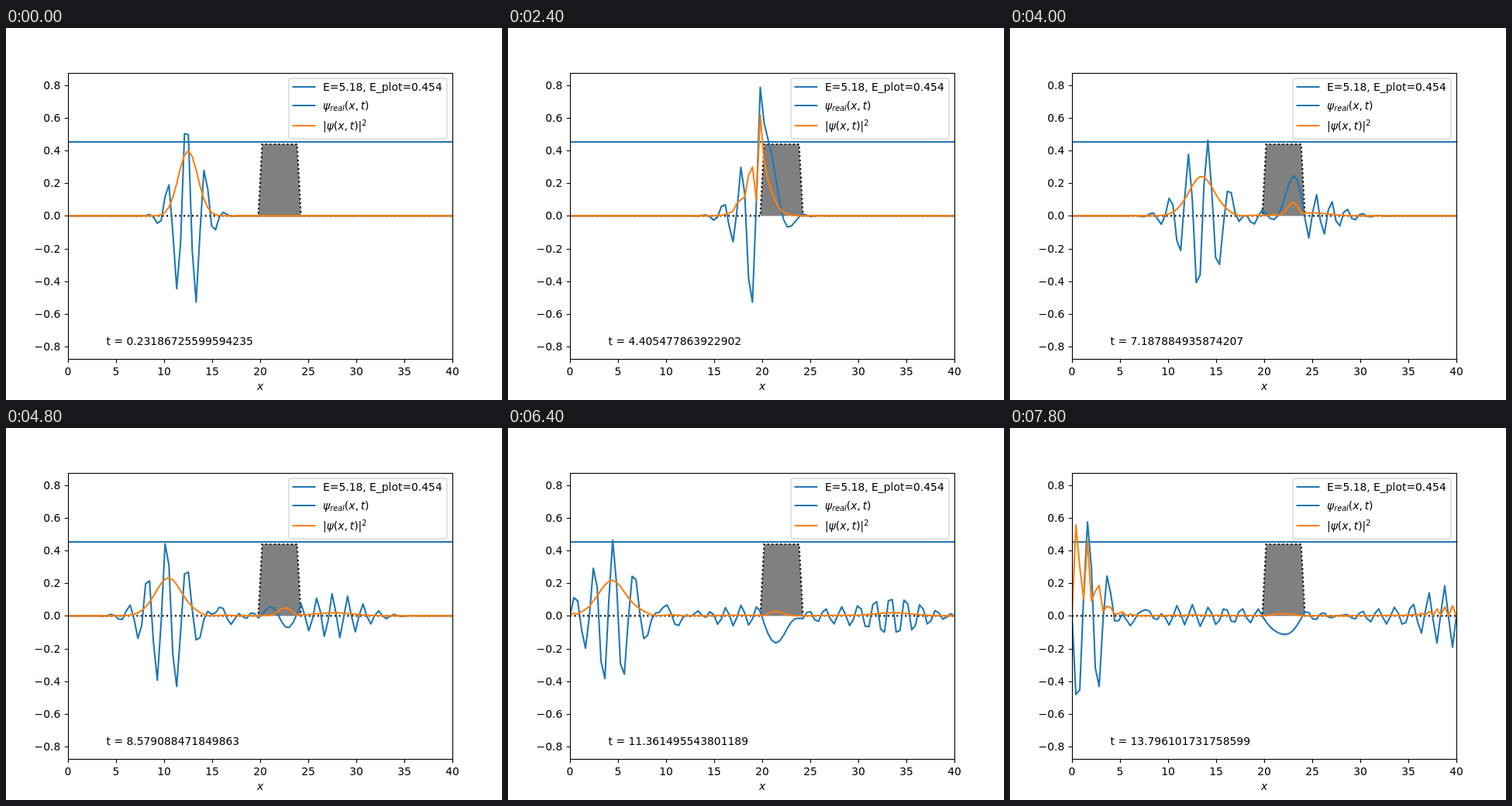
These frames come from a looping animation (640 by 480 pixels, 8000 ms). An HTML page:

```html
<!DOCTYPE html>
<html lang="en">
<head>
<meta charset="utf-8">
<title>Wave packet at a potential barrier</title>
<style>
  html, body { margin: 0; width: 100%; height: 100%; overflow: hidden; background: #fff; }
  svg { display: block; width: 640px; height: 480px; }
  text { font: 13.89px "DejaVu Sans", sans-serif; white-space: pre; }
  .small { font-size: 9.72px; }
  .it { font-style: italic; }
  .line { fill: none; stroke-width: 2.083; stroke-linejoin: round; stroke-linecap: square; }
  .blue { stroke: #1f77b4; }
  .orange { stroke: #ff7f0e; }
  .dotted { fill: none; stroke: #000; stroke-width: 2.083; stroke-dasharray: 2.083 3.4375; }
  .axis { fill: none; stroke: #000; stroke-width: 1.11; }
  .mid { text-anchor: middle; }
  .end { text-anchor: end; }
</style>
</head>
<body>
<svg viewBox="0 0 640 480">
  <clipPath id="plot"><rect x="80" y="57.6" width="496" height="369.6"/></clipPath>
  <g clip-path="url(#plot)">
    <path id="fill" fill="#808080"/>
    <path id="barrier" class="dotted"/>
    <path id="energy" class="line blue"/>
    <path id="real" class="line blue"/>
    <path id="density" class="line orange"/>
  </g>
  <path id="ticks" class="axis"/>
  <rect class="axis" x="80.5" y="58.5" width="496" height="369"/>
  <g id="labels"></g>
  <text class="mid it" x="328" y="467">x</text>
  <text id="time" x="129.6" y="409"></text>

  <rect x="365" y="65" width="204" height="78" rx="2.8" fill="#fff" fill-opacity=".8" stroke="#ccc" stroke-opacity=".8" stroke-width="1.39"/>
  <path class="line blue" d="M370.6 76h27.8M370.6 100h27.8"/>
  <path class="line orange" d="M370.6 126h27.8"/>
  <text x="409" y="81">E=5.18, E_plot=0.454</text>
  <text x="409" y="104.5"><tspan class="it">ψ</tspan><tspan class="it small" dy="2.3">real</tspan><tspan dy="-2.3">(</tspan><tspan class="it">x</tspan>,<tspan class="it" dx="2.78">t</tspan>)</text>
  <text x="409" y="131">|<tspan class="it">ψ</tspan>(<tspan class="it">x</tspan>,<tspan class="it" dx="2.78">t</tspan>)|<tspan class="small" dy="-5.3">2</tspan></text>
</svg>
<script>
const byId = id => document.getElementById(id);

// Grid, barrier and Gaussian packet (hbar = m = 1)
const N = 100, LENGTH = 40, V0 = 5, K0 = Math.PI, START = 12, SIGMA = 1;
const ENERGY = (K0 ** 2 + 0.5 / SIGMA ** 2) / 2;
const dx = LENGTH / (N - 1);
const dt = 0.23186725599594235 / 2;   // 2 / (2 / dx² + V0)
const xs = Array.from({ length: N }, (_, j) => j * dx);
const V = xs.map(x => x >= 20 && x <= 24 ? V0 : 0);

const envelope = x => (2 * Math.PI * SIGMA ** 2) ** -0.25 * Math.exp(-(((x - START) / (2 * SIGMA)) ** 2));
const re = xs.map(x => envelope(x) * Math.cos(K0 * x));
const im = xs.map(x => envelope(x) * Math.sin(K0 * x));
re[0] = im[0] = re[N - 1] = im[N - 1] = 0;

// Plot coordinates
const yMax = 1.5 * Math.max(...re);
const px = x => 80 + x * 12.4;
const py = y => 242.4 - y * 184.8 / yMax;
const curve = values => "M" + values.map((v, j) => px(xs[j]).toFixed(2) + " " + py(v).toFixed(2)).join("L");

// Crank-Nicolson: solve (1 + i dt H / 2) phi = psi, then psi <- 2 phi - psi
const off = -dt / (4 * dx * dx);
const invRe = new Float64Array(N), invIm = new Float64Array(N);
for (let j = 1; j < N - 1; j++) {
  const a = dt / 2 * (1 / dx ** 2 + V[j]) / off - invRe[j - 1];
  const b = -1 / off - invIm[j - 1];
  const norm = a * a + b * b;
  invRe[j] = a / norm;
  invIm[j] = -b / norm;
}

function step() {
  const gRe = new Float64Array(N), gIm = new Float64Array(N);
  for (let j = 1; j < N - 1; j++) {
    const a = im[j] / off - gRe[j - 1], b = -re[j] / off - gIm[j - 1];
    gRe[j] = a * invRe[j] - b * invIm[j];
    gIm[j] = a * invIm[j] + b * invRe[j];
  }
  for (let j = N - 2; j > 0; j--) {
    const a = gRe[j + 1], b = gIm[j + 1];
    gRe[j] -= a * invRe[j] - b * invIm[j];
    gIm[j] -= a * invIm[j] + b * invRe[j];
    re[j] = 2 * gRe[j] - re[j];
    im[j] = 2 * gIm[j] - im[j];
  }
}

// Snapshots: two steps first, then three per picture
const COUNT = 40, HOLD = 200;
const shots = [];
let t = 0;
for (let n = 0; n < COUNT; n++) {
  for (let s = n ? 3 : 2; s > 0; s--) {
    step();
    t += dt;
  }
  shots.push({
    real: curve(re),
    density: curve(re.map((r, j) => r * r + im[j] * im[j])),
    time: "t = " + t
  });
}

// Static parts
const barrier = curve(V.map(v => v / V0 * yMax / 2));
byId("barrier").setAttribute("d", barrier);
byId("fill").setAttribute("d", barrier + "Z");
byId("energy").setAttribute("d", `M80 ${Math.round(py(ENERGY / V0 * yMax / 2))}H576`);

let ticks = "";
function label(x, y, cls, text) {
  const el = document.createElementNS("http://www.w3.org/2000/svg", "text");
  el.setAttribute("x", x);
  el.setAttribute("y", y);
  el.setAttribute("class", cls);
  el.textContent = text;
  byId("labels").append(el);
}
for (let x = 0; x <= LENGTH; x += 5) {
  ticks += `M${px(x) + 0.5} 427.5v4.86`;
  label(px(x), 448, "mid", x);
}
for (let i = -4; i <= 4; i++) {
  const y = Math.round(py(i / 5));
  ticks += `M80.5 ${y + 0.5}h-4.86`;
  label(70.3, y + 5, "end", (i < 0 ? "\u2212" : "") + Math.abs(i / 5).toFixed(1));
}
byId("ticks").setAttribute("d", ticks);

// Playback
let shown = -1;
function show(n) {
  if (n === shown) return;
  shown = n;
  byId("real").setAttribute("d", shots[n].real);
  byId("density").setAttribute("d", shots[n].density);
  byId("time").textContent = shots[n].time;
}
const begin = performance.now();
function play() {
  show(Math.floor((performance.now() - begin) / HOLD) % COUNT);
  requestAnimationFrame(play);
}
play();
</script>
</body>
</html>
```
